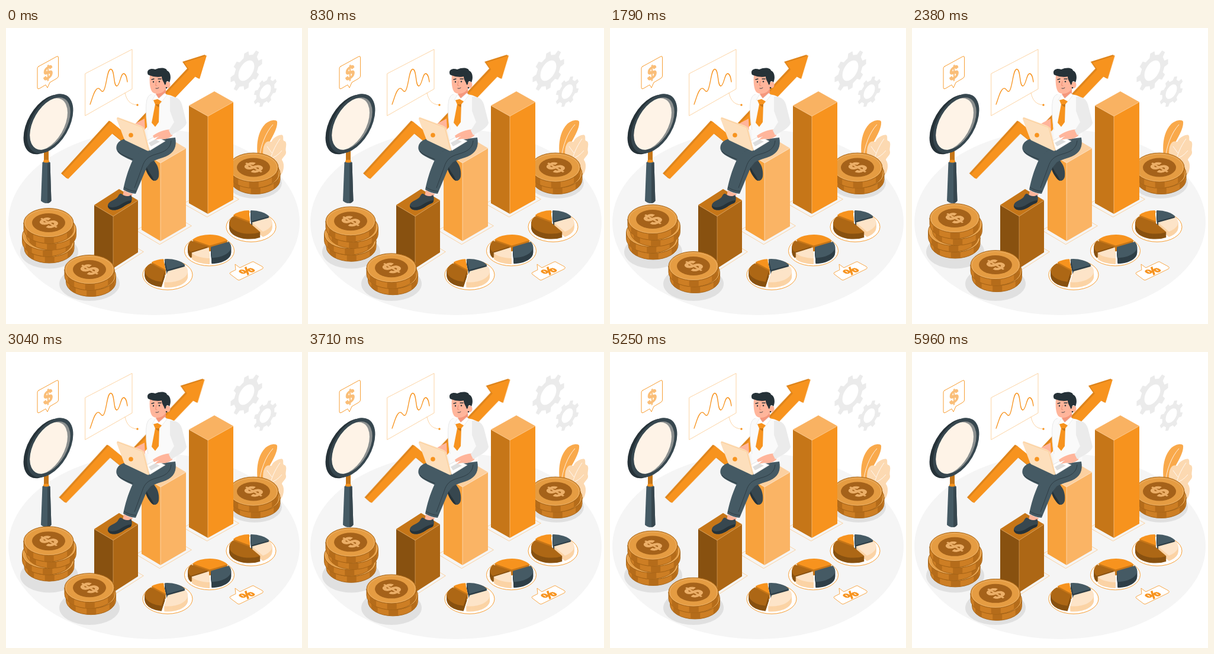
Recreate the animation shown at these times as an HTML page. Size 500 by 500 pixels, loop 6 s.

```html
<!DOCTYPE html>
<html lang="en">
<head>
<meta charset="utf-8">
<title>Growth chart</title>
<style>
  html, body { margin: 0; width: 100%; height: 100%; overflow: hidden; background: #fff; }
  svg { display: block; width: 100%; height: 100%; }
  text { font: bold 36px "Liberation Sans", Arial, sans-serif; text-anchor: middle; stroke-width: 1.2; }
  .float { animation: float 6s linear infinite; }
  .shake { animation: shake 6s linear infinite; }
  @keyframes float {
    50% { transform: translateY(-10px); }
  }
  @keyframes shake {
    0%, 100% { transform: translateX(0); }
    10%, 90% { transform: translateX(-1px); }
    20%, 80% { transform: translateX(2px); }
    30%, 50%, 70% { transform: translateX(-4px); }
    40%, 60% { transform: translateX(4px); }
  }
</style>
</head>
<body>
<svg viewBox="0 0 500 500">
  <ellipse cx="250" cy="328" rx="246" ry="157" fill="#f5f5f5"/>
  <g id="gears" fill="#ebebeb" fill-rule="evenodd"></g>

  <!-- chart card and price tag -->
  <g fill="none" stroke="#f7931e" stroke-linecap="round" stroke-linejoin="round">
    <path d="M134 77L213 36V103L134 148Z" stroke="#fbc98f" stroke-width=".8"/>
    <path d="M142 129C146 119 149 104 155 102C160 101 160 109 164 107C170 102 170 70 177 69.500C184 70 181 97 187 98C193 97 193 77 199 77C203 78 204 84 205 91" stroke-width="1.300"/>
    <path d="M201 110C204 123 210 129 221 130" stroke="#fbc98f" stroke-width=".8"/>
    <path d="M55 65L86 48Q88.500 47 88.500 50V81Q88.500 83 86 85L74 92L70 101L67 96L56 102.500Q53 103.500 53 101V68Q53 66 55 65Z" fill="#fff" stroke-width=".9"/>
  </g>
  <circle cx="222" cy="130" r="1.700" fill="#f7931e"/>
  <text transform="matrix(.866 -.5 0 1 71 75)" y="11.500" fill="#fabe78" stroke="#fabe78" style="font-size:32px">$</text>

  <!-- rising arrow -->
  <g class="shake">
    <path id="arrow" d="M96 247L177 158L205 181L309 70L301 58.500L339 46.500L327 86L320 82L207 200L180 178L105 255Z" fill="#f7931e"/>
  </g>

  <!-- magnifier -->
  <path d="M64 208H72V226H64Z" fill="#c67618"/>
  <path d="M61.500 227Q68 222 74.500 227L76.500 292Q68 300 59 292Z" fill="#455a64"/>
  <path d="M70 229L74.500 227L76.500 292Q74 296 70 296Z" fill="#37474f"/>
  <ellipse cx="68" cy="225" rx="5" ry="2.500" fill="#f7931e"/>
  <clipPath id="lens"><circle r="39.500"/></clipPath>
  <g transform="matrix(.866 -.5 0 1 68.500 163)"><circle r="45" fill="#263238"/></g>
  <g transform="matrix(.866 -.5 0 1 74.500 161.500)">
    <circle r="45" fill="#37474f"/>
    <circle r="39.500" fill="#8b8f8f"/>
    <g clip-path="url(#lens)"><circle cx="-5.500" cy="-1.500" r="39.500" fill="#fef3e7"/></g>
  </g>

  <!-- leaves -->
  <path d="M426 222C422 202 424 176 438 162C446 155 456 154 458 158C459 168 452 180 446 191C440 203 436 213 434 223Z" fill="#f9a94b"/>
  <path d="M428 220C430 200 438 177 451 163" fill="none" stroke="#fff" stroke-width=".8"/>
  <path d="M435 220C433 208 434 196 441 192C446 190 448 194 449 191C452 184 464 179 467 181C470 184 466 191 471 191C476 194 471 204 473 209C474 215 466 219 466 223C470 227 471 240 464 249L440 245Z" fill="#fcd9b1"/>
  <path d="M444 236C446 216 454 200 463 187M449 211L441 200M447 220Q457 218 466 207" fill="none" stroke="#fff" stroke-width=".8"/>

  <g id="right"></g>
  <g id="bars" stroke-linejoin="round"></g>
  <g id="man">
    <!-- far leg -->
    <path d="M236 227C240 222 250 221 252 227C258 234 259 245 258 251C256 260 248 260 244 253C238 246 234 236 236 227Z" fill="#37474f"/>
    <path d="M236 229C237 240 247 248 250 258C246 257 243 252 241 249C237 243 234 236 236 229Z" fill="#263238"/>
    <path d="M240 196L208 187C194 186 184 195 187 206C189 214 203 219 215 225L238 235L262 205Z" fill="#455a64"/>
    <path d="M189 208C195 215 208 219 217 223C221 211 232 205 246 200" fill="none" stroke="#263238" stroke-width=".9"/>
    <!-- shirt -->
    <path d="M246 112C236 114 236 130 237 152L240 191L262 194L287 187L292 124Q286 114 270 112Z" fill="#fafafa"/>
    <path d="M246 112C236 114 236 130 237 152L240 172" fill="none" stroke="#e0e0e0" stroke-width=".7"/>
    <!-- near leg -->
    <path d="M286 185C289 200 284 211 270 217C258 222 244 224 239 232C233 247 226 263 219 280Q207 279 198 273C201 258 206 240 214 223C220 209 238 203 246 199L262 188Z" fill="#455a64"/>
    <path d="M279 190C278 204 268 209 254 213C240 217 234 222 230 235L217 270M199 269Q208 275 220 276" fill="none" stroke="#263238" stroke-width=".7"/>
    <path d="M199 274Q207 279 214 280L211 287L197 285Z" fill="#ffb59b"/>
    <path d="M195 280C200 285 208 285 211 282C214 287 213 294 209 296C200 299 196 305 187 307C178 309 171 305 172 299C174 291 187 291 190 283Q192 279 195 280Z" fill="#37474f"/>
    <path d="M172 300C177 305 187 303 194 298Q203 292 212 291Q212 295 209 296C200 299 196 305 187 307C178 309 172 306 172 300Z" fill="#263238"/>
    <!-- head -->
    <path d="M254 106L270 99V114L261 122L253 116Z" fill="#f5977c"/>
    <ellipse cx="273.500" cy="96" rx="4" ry="5.500" fill="#ffb59b"/>
    <path d="M243 79C242 92 243 103 247 108C251 112 259 112 265 108Q270 104 272 98L270 78Z" fill="#ffb59b"/>
    <path d="M240 79C236 71 244 67 252 70C261 66 271 67 272 72C279 75 279 86 276 92C273 88 270 90 270 95L268 96C267 91 263 88 263 82C254 84 245 81 240 79Z" fill="#263238"/>
    <circle cx="271" cy="101" r="1.300" fill="#263238"/>
    <g fill="none" stroke="#263238" stroke-linecap="round">
      <path d="M246 87L250 86M257 86L262 86" stroke-width="1.300"/>
      <path d="M253 102Q256 103 258 101" stroke-width=".9"/>
      <path d="M254 90L252.500 97L255 97.500" stroke="#e5826a" stroke-width=".8"/>
    </g>
    <g fill="#263238"><circle cx="249" cy="91" r="1.200"/><circle cx="259" cy="90.500" r="1.200"/></g>
    <!-- collar and tie -->
    <path d="M253 112L247 122L256 121L262 126L272 113L268 110L258 119Z" fill="#fff" stroke="#e0e0e0" stroke-width=".6"/>
    <path d="M249 122L256 120L263 124L259 129L258 159L252 167L246 160L252 129Z" fill="#f7931e"/>
    <path d="M252 129L259 129L258 134Z" fill="#c67618"/>
    <!-- hands, laptop, sleeve -->
    <path d="M234 153C229 156 219 160 216 164L228 170L235 172Z" fill="#ffb59b"/>
    <path d="M237 191L252 183L269 191L243 207Z" fill="#fff" stroke="#d9d9d9" stroke-width=".7"/>
    <path d="M241 194L252 188L260 192L245 200Z" fill="#dedede"/>
    <path d="M280 172C270 170 257 176 248 182L250 186L258 183L251 189L262 187Q270 190 281 182Z" fill="#ffb59b"/>
    <path d="M190 151L228 165Q233 167 234 171L242 204Q243 209 238 207L202 190Q200 189 199 186L187 154Q187 150 190 151Z" fill="#fddfbc"/>
    <path d="M188 152L231 168L241 207" fill="none" stroke="#fbc98f" stroke-width=".8"/>
    <circle cx="211" cy="181" r="3.800" fill="#f7931e"/>
    <path d="M277 116C290 115 296 122 298 132L305 160C304 168 290 175 279 181L275 173L284 159L277 140Z" fill="#ebebeb"/>
  </g>

  <g id="pies"></g>
  <path d="M379 413L388 408.500L387 399L395 405L416 395Q418 394 420 396L433 403Q436 405 433 407L396 425Q393 427 391 425L379 416Q377 414 379 413Z" fill="#fff" stroke="#f7931e" stroke-width=".8"/>
  <text transform="matrix(.866 -.5 .866 .5 406.500 410)" y="8" fill="#f7931e" stroke="#f7931e" style="font-size:22px">%</text>
  <g id="left"></g>
  <g id="front"></g>
</svg>
<script>
const byId = id => document.getElementById(id);
const path = (d, fill, more = '') => `<path d="${d}" fill="${fill}" ${more}/>`;
const poly = (pts, fill, more) => path('M' + pts.map(p => p.join(' ')).join('L') + 'Z', fill, more);
const oval = (x, y, rx, ry, fill, more = '') =>
  `<ellipse cx="${x}" cy="${y}" rx="${rx}" ry="${ry}" fill="${fill}" ${more}/>`;
const onOval = (x, y, rx, ry, deg) => {
  const a = deg * Math.PI / 180;
  return [x + rx * Math.cos(a), y + ry * Math.sin(a)];
};

// Thickness of the arrow: darker copies behind its face
const face = byId('arrow');
for (const k of [3, 2, 1]) {
  const edge = face.cloneNode();
  edge.removeAttribute('id');
  edge.setAttribute('fill', '#de841b');
  edge.setAttribute('transform', `translate(${-k} ${-k * .5})`);
  face.before(edge);
}

function gear(x, y, size, hole, phase) {
  const teeth = 8, pts = [];
  for (let i = 0; i < teeth; i++) {
    for (const [turn, r] of [[-.28, .78], [-.17, 1], [.17, 1], [.28, .78]]) {
      pts.push(onOval(0, 0, size * r, size * r, (i + turn + phase) * 360 / teeth));
    }
  }
  const ring = `M${-hole} 0a${hole} ${hole} 0 1 0 ${2 * hole} 0a${hole} ${hole} 0 1 0 ${-2 * hole} 0Z`;
  const d = 'M' + pts.map(p => p.map(v => v.toFixed(2)).join(' ')).join('L') + 'Z' + ring;
  return `<path transform="matrix(.866 -.5 0 1 ${x} ${y})" d="${d}"/>`;
}
byId('gears').innerHTML = gear(406, 72, 31, 15.5, 0) + gear(438, 107.5, 23, 11, .5);

function bar(l, f, r, h, [top, left, right, line]) {
  const back = [l[0] + r[0] - f[0], l[1] + r[1] - f[1]];
  const down = p => [p[0], p[1] + h];
  const mid = [(l[0] + r[0]) / 2, (l[1] + r[1]) / 2 + h];
  const base = [l, f, r, back].map(p => down(p).map((v, i) => mid[i] + (v - mid[i]) * 1.25));
  return poly(base, 'none', 'stroke="#fbc98f" stroke-width=".8"') +
    poly([l, f, down(f), down(l)], left) +
    poly([f, r, down(r), down(f)], right) +
    poly([l, f, r, back], top) +
    path(`M${l}L${f}L${r}M${f}V${f[1] + h}`, 'none', `stroke="${line}" stroke-width=".7"`);
}
byId('bars').innerHTML =
  bar([309, 131], [341, 149], [384, 125], 165, ['#f9b262', '#c67618', '#f7931e', '#fbc98f']) +
  bar([229, 209], [261, 228], [304, 203], 132, ['#fcd0a0', '#f8a23d', '#fab465', '#fde4c8']) +
  bar([149, 299], [181, 318], [223, 291], 88, ['#c67618', '#885110', '#ad6715', '#dba35c']);

const RX = 42, RY = 24.5, THICK = 10.5;
function coin(x, y) {
  const band = (a, b) => {
    const [p, q] = [onOval(x, y, RX, RY, a), onOval(x, y, RX, RY, b)];
    return `M${p}A${RX} ${RY} 0 0 1 ${q}v${THICK}A${RX} ${RY} 0 0 0 ${p[0]} ${p[1] + THICK}Z`;
  };
  const line = 'stroke="#a05f14" stroke-width=".9"';
  const marks = [[18, 42], [78, 100], [128, 150]];
  return path(band(0, 180), '#cd7e24', line) +
    marks.map(m => path(band(...m), '#b56c1a')).join('') +
    oval(x, y, RX, RY, '#e59c42', line) +
    oval(x, y + .5, RX - 2, RY - 1.5, 'none', 'stroke="#f0bd7d" stroke-width=".6"');
}
function stack(id, shadow, coins, cls = '') {
  const [x, y] = coins[coins.length - 1];
  byId(id).innerHTML = oval(...shadow, '#e0e0e0') +
    `<g class="${cls}">` + coins.map(c => coin(...c)).join('') +
    oval(x, y, 28, 16, '#a5621a') +
    `<text transform="matrix(.866 -.5 .866 .5 ${x} ${y})" y="12.5" fill="#ecaf68" stroke="#ecaf68">$</text></g>`;
}
stack('right', [420, 262, 46, 26], [[421, 245.5], [418, 235.5]]);
stack('left', [73, 378, 49, 28.5], [[73, 362], [69.5, 351], [76.5, 340], [72, 329]], 'float');
stack('front', [141, 432, 51, 29], [[143.5, 418.5], [141, 408]], 'float');

const ORANGE = ['#f7931e', '#c67618'], BROWN = ['#ad6715', '#885110'],
  CREAM = ['#fde4c8', '#fbd3a5'], SLATE = ['#455a64', '#2f3f47'];

function slice(x, y, rx, ry, h, a, b, [top, side]) {
  const [cx, cy] = onOval(x, y, 2.6, 1.6, (a + b) / 2);
  const d = `M${cx} ${cy}L${onOval(cx, cy, rx, ry, a)}A${rx} ${ry} 0 ${+(b - a > 180)} 1 ${onOval(cx, cy, rx, ry, b)}Z`;
  let out = '';
  for (let k = h; k > 0; k--) out += path(d, side, `transform="translate(0 ${k})"`);
  return out + path(d, top);
}
function pie(ring, x, y, h, slices) {
  return oval(...ring, 42, 25.3, '#fff', 'stroke="#f7931e" stroke-width=".9"') +
    slices.map(([a, b, color]) => slice(x, y, 34, 18.5, h, a, b, color)).join('');
}
byId('pies').innerHTML =
  pie([273, 417], 271, 410, 9, [[225, 263, ORANGE], [263, 333, SLATE], [100, 225, BROWN], [-27, 100, CREAM]]) +
  pie([343.5, 376.5], 344, 369, 10, [[212, 332, ORANGE], [150, 212, BROWN], [88, 150, CREAM], [-28, 88, SLATE]]) +
  pie([414, 336], 413, 328, 9, [[215, 268, ORANGE], [268, 333, SLATE], [-27, 57, CREAM], [57, 215, BROWN]]);
</script>
</body>
</html>
```
